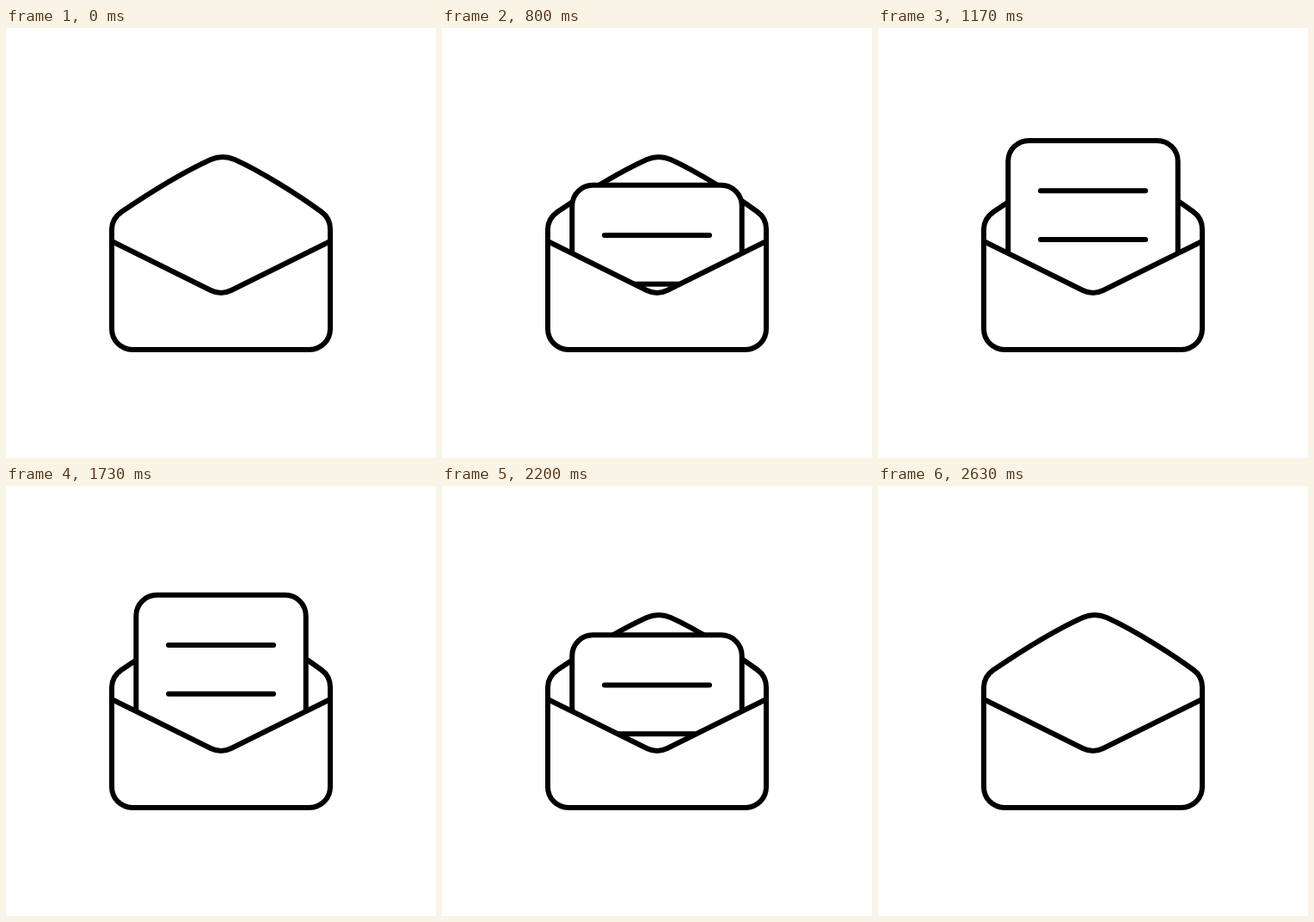
An HTML page for the animation above (3.03 s loop, 500 px wide and 500 px high).

```html
<!DOCTYPE html>
<html lang="en">
<head>
<meta charset="utf-8">
<title>Envelope</title>
<style>
  html, body { margin: 0; width: 100%; height: 100%; overflow: hidden; background: #fff; }
  svg { display: block; width: 100%; height: 100%; }
</style>
</head>
<body>
<svg viewBox="0 0 500 500" fill="none" stroke="#000" stroke-width="6" stroke-linecap="round" stroke-linejoin="round">
  <defs>
    <clipPath id="mouth">
      <path d="M123 248V0H377V248L262 305Q250 311 238 305Z"/>
    </clipPath>
  </defs>
  <path d="M123 234C123 226 127 219 134 214C165 193 205 168 238 153Q252 147 266 153C295 166 340 194 367 214C374 219 377 226 377 234V350A24 24 0 0 1 353 374H147A24 24 0 0 1 123 350Z"/>
  <g clip-path="url(#mouth)">
    <g id="letter">
      <path fill="#fff" d="M151.3 260V24A24 24 0 0 1 175.3 0H324.7A24 24 0 0 1 348.7 24V260"/>
      <path d="M189 58.2H311M189 115H311"/>
    </g>
  </g>
  <path d="M123 248L238 305Q250 311 262 305L377 248"/>
</svg>
<script>
  const LOOP = 3030;
  const REST = 126;
  const letter = document.getElementById('letter');

  // Height of the letter's top edge while it rises and slows down.
  const rise = t => REST + 57 * Math.pow(Math.max(0, 1480 - t) / 680, 3.1);

  // The way down runs the rise backwards, with a short pause midway.
  function letterTop(t) {
    if (t < 1520) return rise(t);
    if (t < 2200) return rise(3040 - t);
    if (t < 2270) return rise(840);
    return rise(3070 - t);
  }

  function draw(t) {
    letter.setAttribute('transform', `translate(0 ${letterTop(t).toFixed(2)})`);
  }

  const start = performance.now();
  function tick() {
    draw((performance.now() - start) % LOOP);
    requestAnimationFrame(tick);
  }
  tick();
</script>
</body>
</html>
```
